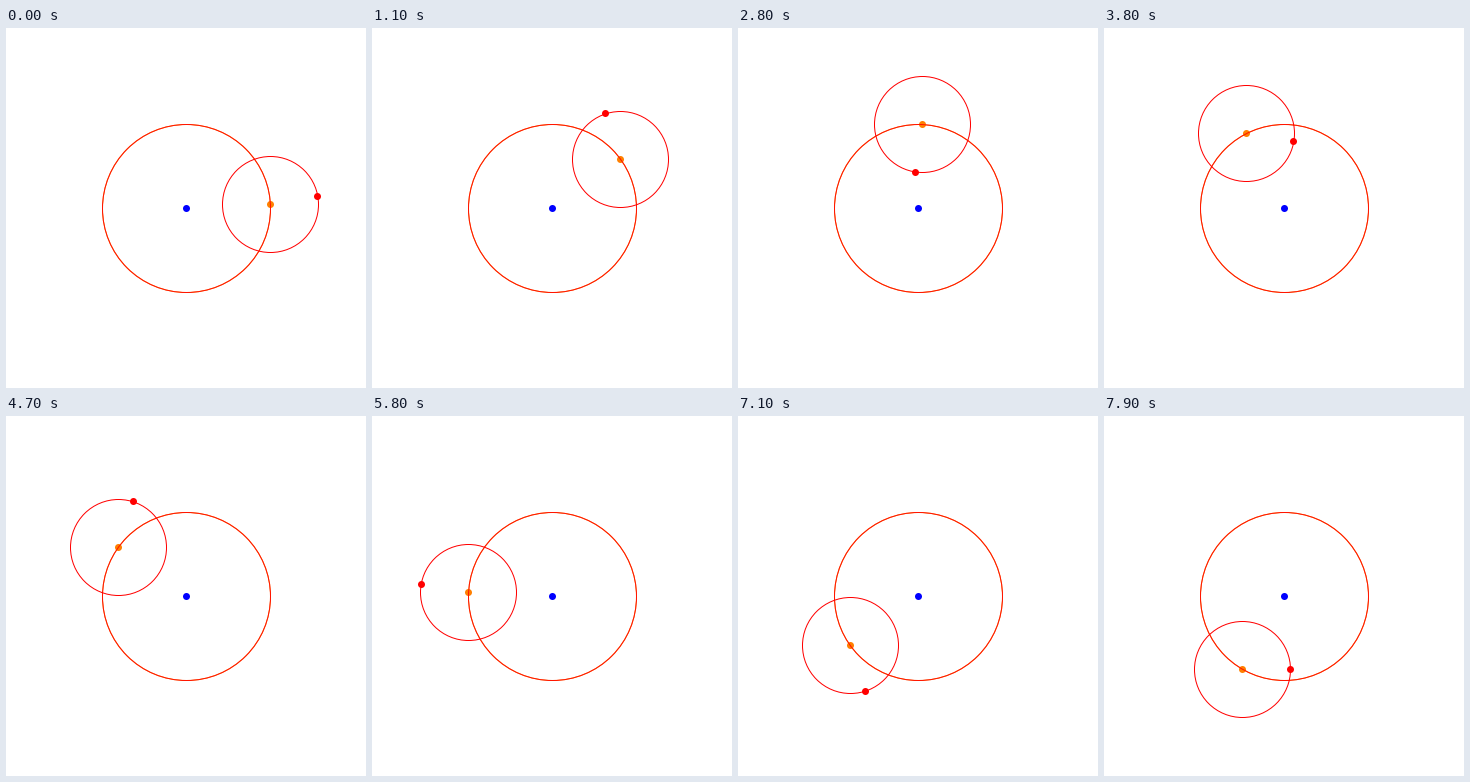
These frames come from a looping animation (360 px wide and 360 px high, 8 s). A matplotlib script:

```python
import matplotlib.pyplot as plt
import numpy as np
from matplotlib.animation import FuncAnimation
from matplotlib.patches import Circle

SIZE, DPI = 360, 72  # at 72 dpi one point is one pixel
FRAMES, INTERVAL = 80, 100
CENTER = np.array([180.0, 180.0])
R_DEFERENT, R_EPICYCLE, R_DOT = 84, 48, 3.5
STEP, RATIO = 3, 3  # degrees per frame, epicycle speed factor

fig = plt.figure(figsize=(SIZE / DPI, SIZE / DPI), dpi=DPI, facecolor="white")
ax = fig.add_axes([0, 0, 1, 1])
ax.set_xlim(0, SIZE)
ax.set_ylim(SIZE, 0)
ax.axis("off")


def ring(radius, color, z, **style):
    return ax.add_patch(Circle(CENTER + 0.5, radius, fill=False, ec=color,
                               lw=1, zorder=z, **style))


def dot(color, z):
    return ax.add_patch(Circle(CENTER + 0.5, R_DOT, fc=color, lw=0, zorder=z))


def polar(radius, degrees):
    a = np.radians(degrees)
    return radius * np.array([np.cos(a), -np.sin(a)])


def place(patch, point):
    """Centre a patch on the nearest whole pixel."""
    patch.center = tuple(np.floor(point + 0.5) + 0.5)


ring(R_DEFERENT, "#ff8000", 1)
ring(R_DEFERENT, "#ff0000", 3, alpha=0.85)
dot("#0000ff", 2)
hub = dot("#ff8000", 2)
epicycle = ring(R_EPICYCLE, "#ff0000", 4)
planet = dot("#ff0000", 5)


def update(i):
    angle = STEP * (i + 1)
    mid = CENTER + polar(R_DEFERENT, angle)
    place(hub, mid)
    place(epicycle, mid)
    place(planet, mid + polar(R_EPICYCLE, RATIO * angle))
    return hub, epicycle, planet


anim = FuncAnimation(fig, update, frames=FRAMES, interval=INTERVAL,
                     repeat=True, repeat_delay=0)
plt.show()
```
